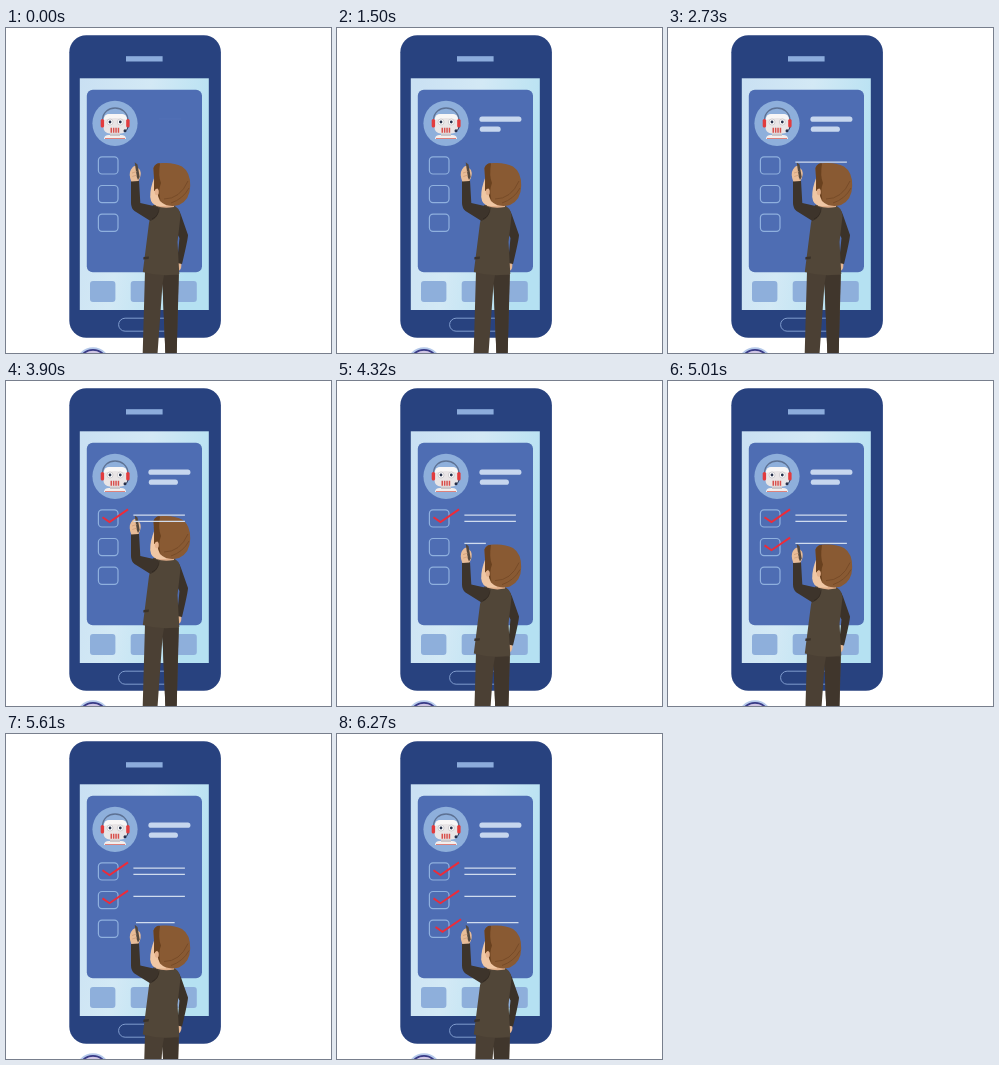
Write an HTML page that moves like this. It is 325 px wide and 325 px high and loops after 6540 ms.

```html
<!DOCTYPE html>
<html lang="en">
<head>
<meta charset="utf-8">
<title>Checklist</title>
<style>
html, body { margin: 0; width: 100%; height: 100%; overflow: hidden; background: #fff; }
svg { display: block; width: 100vw; height: 100vh; }
.stroke { fill: none; }
</style>
</head>
<body>
<svg viewBox="0 0 325 325">
  <defs>
    <linearGradient id="glass" x1="0" y1="0" x2="1" y2=".35">
      <stop offset="0" stop-color="#c9e0f3"/>
      <stop offset=".5" stop-color="#d3e9f5"/>
      <stop offset="1" stop-color="#b5e1f2"/>
    </linearGradient>
    <rect id="box" x="92.4" y="128.8" width="19.6" height="17.2" rx="3.6"/>
    <rect id="button" x="84" y="253" width="25.4" height="21" rx="3"/>
  </defs>

  <!-- phone -->
  <rect x="63.3" y="7.2" width="151.6" height="302.6" rx="17" fill="#28427f"/>
  <rect x="120" y="28.2" width="36.6" height="5.3" fill="#8cacdc"/>
  <rect x="73.8" y="50.3" width="129" height="231.7" fill="url(#glass)"/>
  <rect x="80.8" y="61.8" width="115.2" height="182.5" rx="6" fill="#4e6db3"/>
  <g fill="#8eafdb">
    <use href="#button"/><use href="#button" x="40.7"/><use href="#button" x="81.4"/>
  </g>
  <rect x="112.6" y="290.2" width="52" height="13" rx="6.5" class="stroke" stroke="#7f9bcd"/>
  <g class="stroke" stroke="#8fb0de" stroke-width="1.2">
    <use href="#box"/><use href="#box" y="28.7"/><use href="#box" y="57.4"/>
  </g>
  <path d="M153 91H175" stroke="#5270b6"/>

  <!-- robot avatar -->
  <circle cx="109" cy="95.3" r="22.6" fill="#8eafdb"/>
  <path d="M96.5 92C97 76 121 76 122 92" class="stroke" stroke="#5d7193" stroke-width="1.3"/>
  <path d="M98 111Q98 107 103 107H115Q120 107 120 111Z" fill="#f3efee"/>
  <rect x="104" y="104" width="10" height="4" fill="#c9c6ca"/>
  <rect x="97.5" y="86" width="23.5" height="19.5" rx="6" fill="#e9e5e6"/>
  <path d="M97.8 92Q98 86 103 86H116Q121 86 121 92Q109 88 97.8 92Z" fill="#f8f6f6"/>
  <g fill="#e23b3d">
    <rect x="94.7" y="91" width="3.4" height="8.5" rx="1.6"/>
    <rect x="120.2" y="91" width="3.4" height="8.5" rx="1.6"/>
  </g>
  <g fill="#fff" stroke="#b9b6bb" stroke-width=".6">
    <circle cx="104" cy="94" r="3"/><circle cx="114.3" cy="94" r="3"/>
  </g>
  <g fill="#26304a">
    <circle cx="104" cy="94" r="1.4"/><circle cx="114.3" cy="94" r="1.4"/>
    <circle cx="119" cy="102.8" r="1.5"/>
  </g>
  <path d="M122 99Q122 102 119 102.8" class="stroke" stroke="#26304a" stroke-width=".8"/>
  <path d="M104.5 102.3H114" stroke="#d8504c" stroke-width="5" stroke-dasharray="1.5 .9"/>
  <path d="M99 110.5H119" stroke="#d9655f" stroke-width=".8"/>

  <!-- badge at the lower edge -->
  <circle cx="87" cy="336.5" r="17.2" fill="#b5c9ea"/>
  <circle cx="87" cy="336.5" r="14.6" fill="#cfc5e4" stroke="#393a86" stroke-width="1.8"/>

  <!-- man -->
  <g id="man">
    <path d="M139 243L136.3 340H150.5L156.5 256L160 340H170.3L173 243Z" fill="#4b4034"/>
    <path d="M156.5 256L158 247L172.5 247L170.3 340H160Z" fill="#40362c"/>
    <path d="M171 235L175 234Q176.5 241 172.5 243Q170 241 171 235Z" fill="#e5b793"/>
    <path d="M166 179Q173 180 175 187L182 207Q182 211 176 236L171 235L173.5 210L166 196Z" fill="#3b3229"/>
    <path d="M147 177H166Q174 179 174.5 188L171.5 214L173.3 246Q155 249 136.8 244L143 195Z" fill="#514638"/>
    <path d="M137.5 229L143 228.6L142.6 231L137.3 231.4Z" fill="#3b3229"/>
    <path d="M125 153L133 152.5L134.3 175L152 179Q154 189 144.5 193L128.5 183Q125 180 125 175Z" fill="#3d342b"/>
    <path d="M146 191Q153 188 153 180" class="stroke" stroke="#302820" stroke-width=".8"/>
    <path d="M125.3 153.5Q122.3 146 125 141.5Q127.5 137 130 138L134 142Q136 147 132.5 153Z" fill="#e9bd98"/>
    <path d="M128.7 134.3L131.5 136.5L133.7 149L132 152L130.8 149Z" fill="#54483d"/>
    <path d="M126 145L130.8 143.5M126.3 148.5L131 147" class="stroke" stroke="#c99a76" stroke-width=".7"/>
    <path d="M150 171H168V179Q158 181 150 178Z" fill="#e0ae89"/>
    <path d="M148.5 149Q144 160 144.2 169Q145 177 152 178H160V150Z" fill="#f0c7a4"/>
    <path d="M147.5 140Q149 134.5 158 135Q168 134.5 176 138.5Q184.5 144 184.2 158Q184 172 173 177Q161 180 154 173Q151 167 151.5 160L148 163Q148.5 152 147.5 140Z" fill="#895a33"/>
    <path d="M147.5 140Q150 134.5 154 135.5Q152 148 155 155Q152 162 154.5 172.5Q150.8 167 151.5 160L148 163Q148.5 152 147.5 140Z" fill="#69411f"/>
    <path d="M158 171Q174 171 182 153M165 175Q177 171 183 160" class="stroke" stroke="#754a28" stroke-width=".9"/>
    <ellipse cx="150.8" cy="164" rx="2" ry="3.2" fill="#e5b28d"/>
  </g>
  <g id="marks" class="stroke"></g>
</svg>
<script>
const LOOP = 6540, STEP = 30;
const man = document.getElementById('man');
const layer = document.getElementById('marks');
const marks = [];

// A stroke revealed from its left end between two times.
function mark(d, start, end, color, width, from = 0, cap = 'butt') {
  const el = document.createElementNS('http://www.w3.org/2000/svg', 'path');
  const attrs = { d, stroke: color, 'stroke-width': width, 'stroke-linecap': cap, pathLength: 1 };
  for (const key in attrs) el.setAttribute(key, attrs[key]);
  layer.append(el);
  marks.push({ el, start, end, from });
}
const bar = (x1, x2, y, start, end) =>
  mark(`M${x1} ${y}H${x2}`, start, end, '#c6d6ee', 5.2, .63, 'round');
const rule = (x, y, start, end) =>
  mark(`M${x} ${y}h51.5`, start, end, '#d0dcee', 1.3);
const check = (x, y, start, end) =>
  mark(`M${x} ${y}L${x + 7} ${y + 4.8}L${x + 25.5} ${y - 7.8}`, start, end, '#ee2b38', 1.9);

bar(145, 181.8, 91.2, 750, 1110);
bar(145.4, 169.3, 101.2, 1500, 1890);
rule(127.4, 134.2, 2400, 2730);
rule(127.4, 140.3, 3090, 3420);
check(96.5, 136.2, 3660, 3900);
rule(127.4, 162.4, 4200, 4530);
check(96.5, 164.4, 4800, 5010);
rule(130, 188.6, 5370, 5700);
check(98.5, 193, 6000, 6270);

function manDrop(t) {
  if (t < 4080) return 0;
  if (t < 5190) return 28.6;
  const settle = Math.min(1, Math.max(0, (t - 5280) / 60));
  return 58.5 - 2 * settle;
}

function draw(now) {
  const t = Math.floor(now % LOOP / STEP) * STEP;
  man.setAttribute('transform', `translate(0 ${manDrop(t)})`);
  for (const { el, start, end, from } of marks) {
    const p = Math.min(1, (t - start + STEP) / (end - start + STEP));
    el.style.display = t < start ? 'none' : '';
    el.setAttribute('stroke-dasharray', p < 1 ? `${from + (1 - from) * p} 2` : 'none');
  }
  requestAnimationFrame(draw);
}
draw(performance.now());
</script>
</body>
</html>
```
